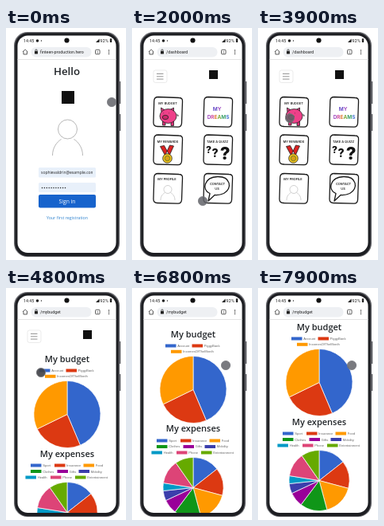
An HTML page for the animation above (8000 ms loop, 151 by 291 pixels).

```html
<!DOCTYPE html>
<html lang="en">
<head>
<meta charset="utf-8">
<style>
  html, body { margin: 0; width: 100%; height: 100%; overflow: hidden; background: #fff; }
  svg { display: block; width: 100vw; height: 100vh; }
  text { font-family: "Open Sans", "Noto Sans", sans-serif; }
  .ui { fill: #222; }
  .ui text { font: 5.3px Roboto, sans-serif; }
  .h { font-weight: 600; font-size: 11px; fill: #212529; text-anchor: middle; }
  .legend { font: 4.15px "Liberation Sans", Arial, sans-serif; fill: #666; }
  .card text { font-family: Inter, sans-serif; font-weight: 600; font-size: 3.9px; fill: #222; text-anchor: middle; }
  .card .mark { font-weight: 800; fill: #111; }
  .card .dream { font-weight: 700; font-size: 6.4px; }
  .ink { fill: none; stroke: #1a1a1a; stroke-width: 1.3; stroke-linecap: round; stroke-linejoin: round; }
  .thin { fill: none; stroke: #888; stroke-width: .6; }
</style>
</head>
<body>
<svg viewBox="0 0 151 291">
  <defs>
    <clipPath id="view"><path d="M14.500 40H138.500V269a13 13 0 0 1-13 13H27.500a13 13 0 0 1-13-13Z"/></clipPath>
    <clipPath id="field"><rect x="43" y="174" width="66" height="14"/></clipPath>
    <g id="menu">
      <rect x="27" y="53" width="17" height="15.500" rx="2.500" fill="#fff" stroke="#ddd" stroke-width=".6"/>
      <path d="M31 57.500h8.500M31 60.800h8.500M31 64.100h8.500" stroke="#888" stroke-width=".9"/>
      <rect x="97" y="53" width="11" height="11" fill="#111"/>
    </g>
  </defs>

  <rect width="151" height="291" fill="#fff"/>
  <path d="M143.300 67v28M143.300 108v21" stroke="#55565c" stroke-width="1.800"/>
  <rect x="10" y="5" width="133" height="282" rx="17" fill="#6a6b70"/>
  <rect x="11.300" y="6.300" width="130.400" height="280" rx="16" fill="#1d1e22"/>
  <rect x="14.500" y="9.500" width="124" height="272.500" rx="13" fill="#fff"/>

  <g class="ui">
    <text x="22" y="18">14:45</text>
    <circle cx="39.500" cy="16" r="1.800"/><circle cx="44.500" cy="16" r=".7"/>
    <circle cx="76.500" cy="15.500" r="3.100" fill="#111"/>
    <path d="M113 18l4.500-4.500v4.500z"/>
    <text x="118.300" y="18" style="font-size:5.700px">92%</text>
    <rect x="130.800" y="13.200" width="2.300" height="4.800" rx=".5"/>
    <path d="M21 30l3.200-3 3.200 3M22 29.500v3.500h4.400v-3.500" fill="none" stroke="#333" stroke-width=".8"/>
    <rect x="31.500" y="24" width="76" height="12.500" rx="6.200" fill="#eef0f3"/>
    <rect x="36" y="29" width="4" height="3.500" rx=".5"/>
    <path d="M36.900 29v-1a1.100 1.100 0 0 1 2.200 0v1" fill="none" stroke="#222" stroke-width=".7"/>
    <text id="url" x="43" y="32"></text>
    <rect x="112.500" y="27.300" width="5.500" height="5.500" rx="1" fill="none" stroke="#333" stroke-width=".8"/>
    <text x="114.200" y="31.600" style="font-size:4px">1</text>
    <circle cx="129.500" cy="28" r=".65"/><circle cx="129.500" cy="30.200" r=".65"/><circle cx="129.500" cy="32.400" r=".65"/>
    <path d="M14.500 39.500h124" stroke="#ddd" stroke-width=".8"/>
  </g>

  <g clip-path="url(#view)">
    <g id="login">
      <text class="h" x="76.500" y="58.500" style="font-size:13.300px">Hello</text>
      <rect x="70" y="79" width="16" height="16" fill="#111"/>
      <circle class="thin" cx="77.500" cy="127" r="12"/>
      <path class="thin" d="M58.500 160c0-10 5.500-17 11-20.500M96.500 160c0-10-5.500-17-11-20.500"/>
      <rect x="41" y="175" width="72" height="12.500" rx="1.500" fill="#e8f0fa"/>
      <text x="44" y="183" font-size="5" fill="#222" clip-path="url(#field)">sophievaldrin@example.com</text>
      <rect x="41" y="194" width="72" height="12" rx="1.500" fill="#e8f0fa"/>
      <path d="M45.500 200.500H75" stroke="#222" stroke-width="1.500" stroke-linecap="round" stroke-dasharray="0 2.900"/>
      <rect id="ring" x="40" y="208" width="74" height="18" rx="3" fill="none" stroke="#9cc4ee" stroke-width="2"/>
      <rect id="button" x="41" y="209" width="72" height="16.500" rx="2"/>
      <text x="77" y="219.800" font-size="6.800" fill="#fff" text-anchor="middle">Sign in</text>
      <text x="77" y="239.800" font-size="5.300" fill="#2f83cf" text-anchor="middle">Your first registration</text>
    </g>

    <g id="dashboard">
      <use href="#menu"/>
      <g id="cards"></g>
      <g stroke="#222" stroke-width=".8">
        <path d="M38.500 116v6h3.500v-4M49 118v4.500h3.500v-6" fill="#d92f76"/>
        <path d="M37 106l-.5-6 5 3M47 103l5.500-3v6" fill="#e43d86"/>
        <ellipse cx="45.500" cy="110.500" rx="10.500" ry="9" fill="#ee4089"/>
        <ellipse cx="42" cy="112" rx="3.700" ry="2.700" fill="#c9286a"/>
        <path d="M39.500 106.800h.6M46 106.800h.6M56 109q3-1 2 2" fill="none"/>
        <path d="M35.500 148.500l6.500 12 4.500-2-6-11zM52.500 148l-5.500 12-4.500-2 5-11z" fill="#dc2323"/>
        <circle cx="44.500" cy="163.500" r="5.800" fill="#f2c31d"/>
        <circle cx="44.500" cy="163.500" r="3.200" fill="#d9a01a" stroke="#5c7a20"/>
      </g>
      <g class="card">
        <text x="45" y="96">MY BUDGET</text>
        <text x="45" y="143.500">MY REWARDS</text>
        <text x="44" y="190.500">MY PROFILE</text>
        <text x="107.500" y="143.500">TAKE A QUIZZ</text>
        <text x="107.500" y="197">CONTACT</text>
        <text x="107" y="203">US</text>
        <text class="mark" x="96.500" y="156.500" style="font-size:12px">?</text>
        <text class="mark" x="104.500" y="162" style="font-size:14px">?</text>
        <text class="mark" x="117" y="164.500" style="font-size:22px">?</text>
        <text class="dream" id="my" x="107" y="103.500"></text>
        <text class="dream" id="dreams" x="108.500" y="114"></text>
      </g>
      <g class="thin" opacity=".65">
        <circle cx="45" cy="202.500" r="5"/>
        <path d="M36 216c0-5.500 3-8 5.500-9.500M54 216c0-5.500-3-8-5.500-9.500"/>
      </g>
      <path class="ink" d="M98 207.500C87 203 91 187 107.500 186.500S127 201 115.500 207.500Q110 210 104 209.500L96 217Z"/>
    </g>

    <g id="budget">
      <use href="#menu"/>
      <text class="h" x="77" y="93">My budget</text>
      <text class="h" x="77" y="211.500">My expenses</text>
    </g>
  </g>

  <g id="cursor">
    <circle id="halo" r="9.500" fill="#555" opacity=".25"/>
    <circle id="dot" r="5.600" stroke="#77787d" stroke-width=".8"/>
  </g>
</svg>

<script>
const LOOP = 8000;
const COLORS = ['#3366cc', '#dc3912', '#ff9900', '#109618', '#990099', '#3b3eac', '#0099c6', '#dd4477', '#66aa00'];
const $ = id => document.getElementById(id);

function add(parent, tag, attrs, text = '') {
  const el = document.createElementNS('http://www.w3.org/2000/svg', tag);
  for (const key in attrs) el.setAttribute(key, attrs[key]);
  el.textContent = text;
  return parent.appendChild(el);
}

function pie(cx, cy, r, ends) {
  const rim = deg => {
    const a = deg * Math.PI / 180;
    return `${cx + r * Math.sin(a)} ${cy - r * Math.cos(a)}`;
  };
  let from = 0;
  ends.forEach((to, i) => {
    const end = Math.min(to, 359.99);
    add($('budget'), 'path', {
      d: `M${cx} ${cy}L${rim(from)}A${r} ${r} 0 ${+(end - from > 180)} 1 ${rim(end)}Z`,
      fill: COLORS[i], stroke: '#fff', 'stroke-width': .7
    });
    from = to;
  });
}

function legend(entries) {
  entries.forEach(([label, x, y], i) => {
    add($('budget'), 'rect', { x, y: y - 2, width: 13.5, height: 4, fill: COLORS[i] });
    add($('budget'), 'text', { x: x + 15.2, y: y + 1.5, class: 'legend' }, label);
  });
}

function rainbow(id, word, colors) {
  [...word].forEach((c, i) => add($(id), 'tspan', { fill: colors[i] }, c));
}

legend([['Account', 42, 103.5], ['PiggyBank', 75.5, 103.5], ['IncomesOfTheMonth', 49, 110.8]]);
legend([
  ['Sport', 31, 222.5], ['Insurance', 61, 222.5], ['Food', 97.5, 222.5],
  ['Clothes', 31, 230], ['Gifts', 64.5, 230], ['Mobility', 91.5, 230],
  ['Health', 24.5, 237.5], ['Phone', 56, 237.5], ['Entertainment', 87, 237.5]
]);
pie(77, 158.5, 42, [157, 244, 360]);
pie(77, 281.5, 38, [52, 105, 165, 217, 245, 264, 279, 325, 360]);

// Slightly crooked, hand-drawn card borders
for (const x of [27, 90]) for (const y of [86.5, 134, 182.5]) {
  add($('cards'), 'path', {
    class: 'ink',
    d: `M${x + 6} ${y}L${x + 32} ${y + 1}q5 0 4.500 5L${x + 35.500} ${y + 33}q-.5 5-5 4.700L${x + 5} ${y + 37}q-5 0-5-5L${x + .8} ${y + 5}q0-5 5.200-5Z`
  });
}
rainbow('my', 'MY', ['#6a4fc8', '#a04ac0']);
rainbow('dreams', 'DREAMS', ['#a04ac0', '#d0489a', '#e07a3a', '#7fa83a', '#3aa06a', '#3c6fd0']);

const cursorPath = [
  [0, 133, 93], [300, 133, 93], [400, 120, 122], [500, 105, 155], [650, 105, 155],
  [900, 116, 186], [1200, 89, 214], [1700, 89, 215], [2000, 89, 217], [2300, 89, 213],
  [2500, 78, 170], [2800, 63, 110], [2950, 63, 110], [3200, 93, 164], [3600, 93, 164],
  [3800, 45, 118], [3900, 40, 113], [4100, 46, 110], [4700, 46, 110], [4800, 44, 106],
  [5600, 46, 105], [5900, 85, 82], [6200, 114, 90], [6500, 118, 97], [LOOP, 118, 97]
];
const scrollPath = [[0, 0], [6550, 0], [6800, 31], [7000, 36.5], [7400, 40], [LOOP, 40]];

function along(keys, t) {
  const i = keys.findIndex(k => k[0] > t);
  const a = keys[i - 1], b = keys[i];
  const p = (t - a[0]) / (b[0] - a[0]);
  return a.slice(1).map((v, j) => v + (b[j + 1] - v) * p);
}

const pages = {
  login: 'finteen-production.hero',
  dashboard: '/dashboard',
  budget: '/mybudget'
};

function draw(now) {
  const t = now % LOOP;
  const page = t < 1700 ? 'login' : t < 4800 ? 'dashboard' : 'budget';
  for (const id in pages) $(id).style.display = id === page ? '' : 'none';
  $('url').textContent = pages[page];

  const pressed = t >= 1400 && t < 1700 || t >= 4300 && t < 4800;
  const dark = pressed || t >= 4800 && t < 5000;
  $('ring').style.display = pressed ? '' : 'none';
  $('button').setAttribute('fill', t >= 1100 ? '#1257b5' : '#1763cc');
  $('halo').style.display = pressed ? '' : 'none';
  $('dot').setAttribute('fill', dark ? '#3f4046' : '#626368');
  $('dot').setAttribute('fill-opacity', dark ? .9 : .85);

  $('cursor').setAttribute('transform', `translate(${along(cursorPath, t)})`);
  $('budget').setAttribute('transform', `translate(0 ${-along(scrollPath, t)[0]})`);
  requestAnimationFrame(draw);
}
requestAnimationFrame(draw);
</script>
</body>
</html>
```
